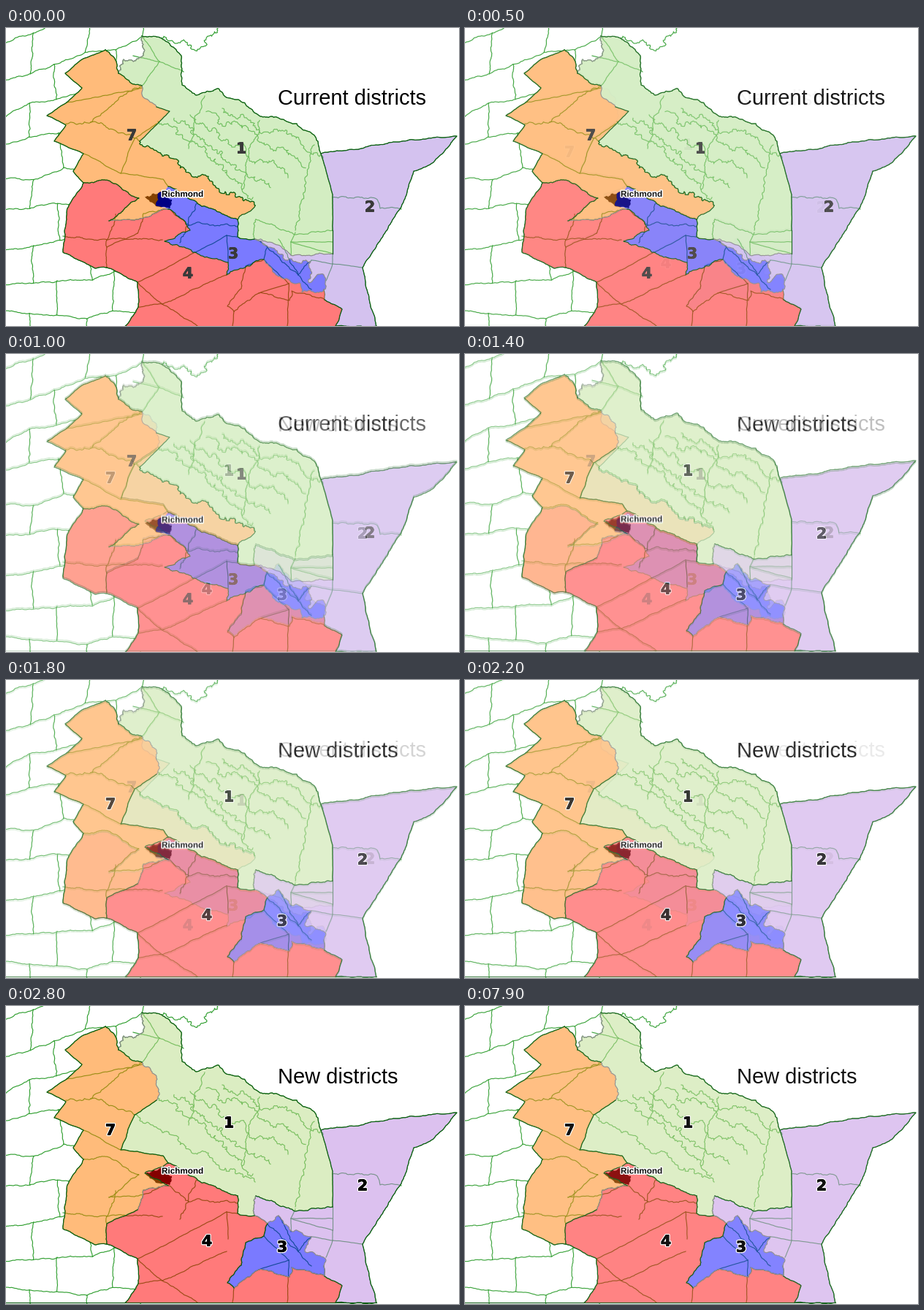
A matplotlib script for the animation above (8000 ms loop, 620 px wide and 408 px high).

```python
import math
import random

import matplotlib.pyplot as plt
import numpy as np
from matplotlib.animation import FuncAnimation
from matplotlib.patheffects import withStroke

W, H, DPI = 620, 408, 100
PX = 72 / DPI
STEP, FRAMES = 100, 80
BOTTOM = 408.4

COUNTY, BORDER, GRAY = "#2f9e2f", "#0b5a12", "#8a8a8a"
RED, ORANGE, BLUE = (255, 0, 0), (255, 126, 0), (0, 0, 255)


def arc(amp, *pts):
    """Line through key points, roughened by midpoint displacement."""
    rng = random.Random(sum((i + 1) * (x + 3 * y) for i, (x, y) in enumerate(pts)))

    def split(a, b):
        dx, dy = b[0] - a[0], b[1] - a[1]
        d = math.hypot(dx, dy)
        if d < 3:
            return [b]
        k = rng.uniform(-1, 1) * amp * min(1, d / 14) / d
        m = ((a[0] + b[0]) / 2 - dy * k, (a[1] + b[1]) / 2 + dx * k)
        return split(a, m) + split(m, b)

    out = [pts[0]]
    for a, b in zip(pts, pts[1:]):
        out += split(a, b)
    return np.array(out)


def fan(amp, n, a, b, c, d):
    """n lines spread evenly from line a-b to line c-d."""
    a, b, c, d = map(np.array, (a, b, c, d))
    ks = np.linspace(0, 1, n)
    return [arc(amp, tuple(a + (c - a) * k), tuple(b + (d - b) * k)) for k in ks]


def spokes(amp, hub, *ends):
    """County lines that meet in one corner."""
    return [arc(amp, hub, end) for end in ends]


def mesh():
    """Brick pattern of loosely placed counties west of the districts."""
    rng = random.Random(4)

    def node(i, j):
        x = 40 * i - 8
        y = 46 * j + 24 - .35 * x * (1 - j / 8)
        return x + rng.uniform(-7, 7), y + rng.uniform(-7, 7)

    grid = {(i, j): node(i, j) for i in range(6) for j in range(-1, 10)}
    lines = []
    for (i, j), p in grid.items():
        if (i + 1, j) in grid:
            lines.append(arc(1.5, p, grid[i + 1, j]))
        if (i, j + 1) in grid and (i + j) % 2:
            lines.append(arc(1.5, p, grid[i, j + 1]))
    return lines


# Borders common to both plans
west7 = arc(.6, (106, 212), (92, 196), (106, 172), (66, 155), (82, 133), (56, 120),
            (83, 102), (104, 82), (81, 62), (104, 43), (136, 30))
top7 = arc(1.5, (136, 30), (151, 46), (154, 62))
neck = arc(2, (154, 62), (172, 76), (186, 79))
north_w = arc(4, (154, 62), (161, 43), (182, 41), (186, 11))
north_e = arc(2, (186, 11), (213, 14), (240, 38), (241, 78), (260, 92), (291, 83),
              (300, 94), (318, 98), (348, 121), (377, 125), (398, 131), (424, 150),
              (431, 172))
east = arc(.3, (431, 172), (447, 228), (447, 277))
east_end = arc(0, (447, 277), (447, 309))
ocean = arc(1, (431, 172), (483, 166), (530, 156), (617, 148), (585, 184), (558, 196),
            (541, 245), (488, 328), (507, BOTTOM), (451, BOTTOM))
james = arc(2, (222, 217), (262, 240), (317, 262))
point = arc(1.5, (317, 262), (317, 286), (340, 289))
coast_a = arc(1, (435, 358), (436, 372))
coast_b = arc(1, (436, 372), (460, 385), (451, BOTTOM))
west4a = arc(1, (163, BOTTOM), (181, 382), (180, 348), (138, 328))
west4b = arc(1, (138, 328), (122, 329), (78, 307), (84, 247), (106, 212))

# Current plan
old71a = arc(2, (186, 79), (188, 95), (206, 108))
old71b = arc(.5, (206, 108), (224, 114), (183, 155))
river = arc(5, (183, 155), (252, 199), (300, 224), (341, 243))
tail = arc(2, (341, 243), (328, 254), (317, 262))
old12 = arc(2, (340, 289), (372, 297), (390, 311), (447, 309))
old32 = arc(4, (340, 289), (357, 298), (393, 319), (417, 320), (414, 348), (435, 338),
            (435, 358))
old34 = arc(3, (435, 358), (405, 362), (402, 349), (375, 340), (353, 317))
old43 = arc(2, (353, 317), (302, 338), (304, 321), (262, 309), (217, 292), (252, 277),
            (240, 261), (222, 248))
old73 = arc(2, (222, 248), (205, 243), (208, 226), (222, 217))
old74a = arc(2, (106, 212), (133, 208), (182, 233), (141, 264))
old74b = arc(2, (141, 264), (178, 262), (222, 248))

# New plan
strip = arc(3, (186, 79), (206, 98), (206, 131))
new71 = arc(.8, (206, 131), (176, 151), (157, 199), (215, 207), (222, 217))
new12a = arc(3, (340, 289), (342, 262))
new12b = arc(2, (342, 262), (358, 268), (396, 283), (418, 279), (447, 277))
link = arc(1.5, (340, 289), (358, 300))
new43a = arc(1.5, (358, 300), (353, 317), (328, 326), (322, 357), (303, 381), (312, 388))
new43b = arc(2, (312, 388), (346, 363), (388, 373), (391, 360), (436, 372))
new32 = arc(3, (358, 300), (373, 289), (392, 311), (418, 318), (409, 338), (438, 350),
            (435, 358))
new74a = arc(2, (222, 217), (190, 231), (222, 248))
new74b = arc(2, (222, 248), (188, 254), (180, 281))
new74c = arc(1, (180, 281), (138, 300), (138, 328))

city = arc(3, (190, 231), (212, 224), (227, 235), (224, 247), (205, 244), (190, 231))

counties = [
    west7, top7, neck, north_w, north_e, east, east_end, ocean, james, point, coast_a,
    coast_b, west4a, west4b, river, old74a, old74b, new71, new12a, new12b, link,
    new43a, new43b, new74b, new74c,
    arc(2, (447, 232), (476, 233), (505, 233), (512, 247), (541, 248)),
    arc(6, (213, 14), (236, 20), (258, 30), (274, 14), (290, 0)),
    *fan(6, 5, (208, 128), (338, 232), (296, 110), (434, 178)),
    *fan(3, 3, (250, 165), (272, 93), (396, 277), (422, 160)),
    *fan(.8, 2, (83, 102), (186, 82), (106, 172), (157, 199)),
    *spokes(1, (210, 46), (186, 11), (243, 60), (186, 79), (174, 38)),
    *spokes(3, (116, 129), (82, 131), (186, 79), (183, 155)),
    *spokes(2, (138, 290), (78, 285), (138, 300), (150, 255), (214, 290)),
    *spokes(3, (250, 270), (222, 248), (262, 240), (317, 272), (238, 294)),
    *spokes(.6, (302, 284), (180, 348), (304, 321), (317, 286)),
    *spokes(1, (214, 378), (180, 348), (181, 382), (302, 338), (262, 408)),
    *spokes(.6, (387, 350), (353, 317), (385, 408), (346, 363)),
    *spokes(2, (400, 338), (358, 300), (373, 289), (418, 318), (418, 358)),
    *spokes(.5, (390, 293), (447, 293), (396, 280), (390, 311), (447, 309)),
    *spokes(.5, (447, 323), (447, 309), (488, 328), (418, 318), (438, 346)),
    arc(.5, (312, 388), (310, 408)),
]

north = [east[::-1], north_e[::-1], north_w[::-1]]
west4 = [west4a, west4b]
shared = [west7, top7, neck, north_e, east, ocean, james, point, coast_b, *west4]

current = dict(
    title="Current districts", ink="#3a3a3a", dy=0, halo=0, base=105,
    areas=[
        ([neck, old71a, old71b, river, tail, point, old12, east_end[::-1], *north],
         (171, 221, 139)),
        ([old12, east_end[::-1], east[::-1], ocean, coast_b[::-1], coast_a[::-1],
          old32[::-1]], (173, 139, 225)),
        ([james, point, old32, old34, old43, old73], BLUE),
        ([old74a, old74b, old43[::-1], old34[::-1], coast_a, coast_b, *west4], RED),
        ([west7, top7, neck, old71a, old71b, river, tail, james[::-1], old73[::-1],
          old74b[::-1], old74a[::-1]], ORANGE),
    ],
    dark=shared + [east_end, old71b, river, tail, old43, old74a],
    gray=[north_w, old71a, old12, old32, old34, old74b],
    labels={"1": (322, 164), "2": (498, 244), "3": (311, 308), "4": (249, 335),
            "7": (172, 146)})

new = dict(
    title="New districts", ink="black", dy=-2, halo=1.6, base=106.5,
    areas=[
        ([neck, strip, new71, james, point, new12a, new12b, *north], (187, 221, 139)),
        ([new12a, new12b, east[::-1], ocean, coast_b[::-1], coast_a[::-1], new32[::-1],
          link[::-1]], (189, 137, 225)),
        ([new32, coast_a, new43b[::-1], new43a[::-1]], BLUE),
        ([james, point, link, new43a, new43b, coast_b, west4a, new74c[::-1],
          new74b[::-1], new74a[::-1]], RED),
        ([west7, top7, neck, strip, new71, new74a, new74b, new74c, west4b], ORANGE),
    ],
    dark=shared + [new71, new12b, new43a, new74a, new74c,
                   arc(0, (0, BOTTOM), (507, BOTTOM))],
    gray=[north_w, strip, new12a, link, new32, coast_a, new43b, new74b],
    labels={"1": (305, 159), "2": (488, 245), "3": (378, 329), "4": (275, 321),
            "7": (143, 169)})

fig = plt.figure(figsize=(W / DPI, H / DPI), dpi=DPI, facecolor="white")
ax = fig.add_axes([0, 0, 1, 1])


def reset():
    ax.clear()
    ax.set_axis_off()
    ax.set_xlim(0, W)
    ax.set_ylim(H, 0)


def outline(width, color):
    return withStroke(linewidth=2 * width * PX, foreground=color)


def render(plan):
    """Draw one map and return it as a float image."""
    reset()
    dy, ink = plan["dy"], plan["ink"]

    def stroke(lines, color, z):
        for line in lines:
            ax.plot(line[:, 0], line[:, 1] + dy, color=color, lw=1.15 * PX, zorder=z)

    def fill(shape, color, z, alpha=1):
        ax.fill(shape[:, 0], shape[:, 1] + dy, color=color, lw=0, zorder=z, alpha=alpha)

    stroke(mesh(), COUNTY, 0)
    for arcs, rgb in plan["areas"]:
        shape = np.vstack(arcs)
        fill(shape, "white", 1)
        fill(shape, np.array(rgb) / 255, 4, .52)
    stroke(counties, COUNTY, 2)
    fill(city, "black", 3)
    stroke(plan["gray"], GRAY, 5)
    stroke(plan["dark"], BORDER, 6)

    for digit, (x, y) in plan["labels"].items():
        ax.text(x, y + 7.5, digit, family="DejaVu Sans", weight="bold", size=20.5 * PX,
                color=ink, ha="center", va="baseline", zorder=7,
                path_effects=[outline(plan["halo"], "white"), outline(.35, ink)])
    ax.text(213, 231 + dy * .75, "Richmond", family="Liberation Sans", weight="bold",
            size=11.7 * PX, va="baseline", path_effects=[outline(1.5, "white")], zorder=7)
    ax.text(371.5, plan["base"], plan["title"], family="Liberation Sans",
            size=29 * PX, va="baseline", zorder=7)
    fig.canvas.draw()
    return np.asarray(fig.canvas.buffer_rgba())[..., :3] / 255.0


before, after = render(current), render(new)
reset()
view = ax.imshow(before, extent=(0, W, H, 0), interpolation="nearest", aspect="auto")

# Strength of each map over white, by tenths of a second
KEYS = [4, 5, 10, 14, 22, 28, 78, 79]
OLD = [1, .88, .58, .25, .08, 0, 0, 0]
NEW = [0, .04, .24, .57, .77, 1, 1, .93]


def update(i):
    a, b = np.interp(i, KEYS, OLD), np.interp(i, KEYS, NEW)
    view.set_data(np.clip(1 - a * (1 - before) - b * (1 - after), 0, 1))
    return [view]


anim = FuncAnimation(fig, update, frames=FRAMES, interval=STEP, repeat=True,
                     repeat_delay=0, init_func=lambda: update(0))
plt.show()
```
